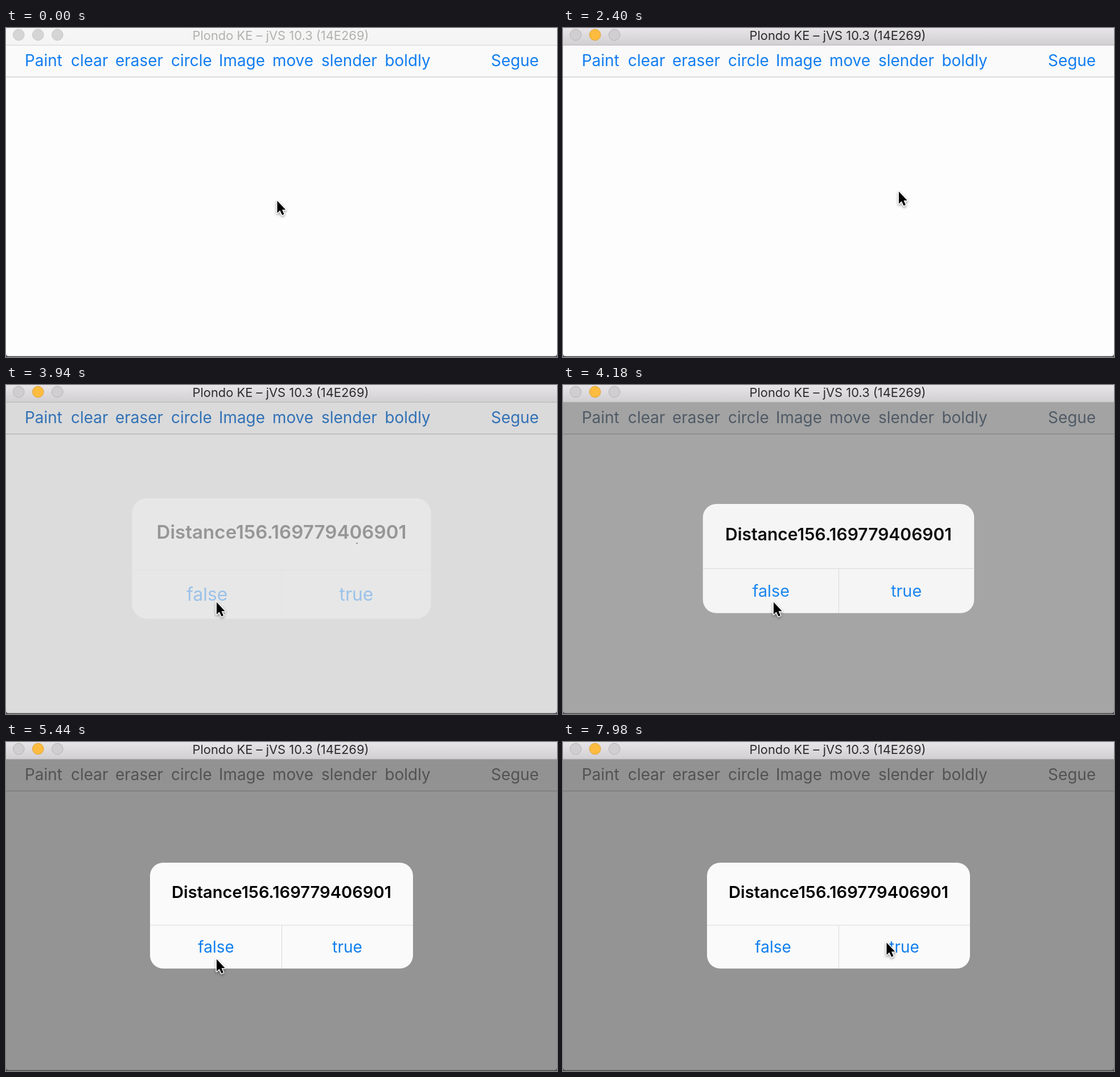
Write an HTML page with a canvas that moves like this. It is 968 px wide and 578 px high and loops after 8 s.

```html
<!DOCTYPE html>
<html lang="en">
<head>
<meta charset="utf-8">
<title>Paint demo</title>
<style>
  html, body { margin: 0; width: 100%; height: 100%; overflow: hidden; background: #fdfdfd; }
  canvas { display: block; }
</style>
</head>
<body>
<canvas id="stage" width="968" height="578"></canvas>
<script>
const ctx = document.getElementById('stage').getContext('2d');
const W = 968, H = 578, LOOP = 8000;
const APP_TOP = 31;
const ACTIVATE = 1900;   // first click focuses the window
const ALERT = 3880;      // second click opens the alert
const SETTLE = 163;      // time constant of the alert animation

const menu = [
  ['Paint', 35], ['clear', 115], ['eraser', 193], ['circle', 291], ['Image', 376],
  ['move', 470], ['slender', 555], ['boldly', 667.5], ['Segue', 853]
];

// Pointer stops: time, x, y
const path = [
  [40, 476, 303], [820, 614, 278], [1540, 616, 276], [2200, 616, 276],
  [3180, 373, 375], [3700, 369.5, 381], [6500, 369.5, 381], [7960, 568, 352]
];

const mix = (a, b, p) => a + (b - a) * p;
const clamp = p => Math.max(0, Math.min(1, p));
const ease = p => p * p * (3 - 2 * p);
const font = (size, weight = 400) => `${weight} ${size}px Inter, "Open Sans", sans-serif`;

function rect(x, y, w, h, color) {
  ctx.fillStyle = color;
  ctx.fillRect(x, y, w, h);
}

function text(str, x, y, color, align = 'center') {
  ctx.fillStyle = color;
  ctx.textAlign = align;
  // Left-aligned labels start at their visible edge
  if (align === 'left') x += ctx.measureText(str).actualBoundingBoxLeft;
  ctx.fillText(str, x, y);
}

function pointerAt(t) {
  let i = 0;
  while (i < path.length - 2 && t >= path[i + 1][0]) i++;
  const [t0, x0, y0] = path[i], [t1, x1, y1] = path[i + 1];
  const p = ease(clamp((t - t0) / (t1 - t0)));
  return [mix(x0, x1, p), mix(y0, y1, p)];
}

function drawTitleBar(active) {
  const shade = ctx.createLinearGradient(0, 0, 0, 30);
  shade.addColorStop(0, active ? '#e7e5e7' : '#f6f6f6');
  shade.addColorStop(1, active ? '#d1cfd1' : '#f4f4f4');
  rect(0, 0, W, 30, shade);
  rect(0, 29.7, W, 1, active ? '#b4b2b4' : '#cfcfcf');
  [22, 56, 90].forEach((x, i) => {
    const lit = active && i === 1;
    ctx.beginPath();
    ctx.arc(x + 0.3, 12, 9.8, 0, 7);
    ctx.fillStyle = lit ? '#fdbc40' : active ? '#d0ced0' : '#d5d5d5';
    ctx.fill();
    ctx.strokeStyle = lit ? '#dfa037' : active ? '#b5b3b5' : '#c6c6c6';
    ctx.lineWidth = 1;
    ctx.stroke();
  });
  ctx.font = font(21.9);
  text('Plondo KE – jVS 10.3 (14E269)', 482.5, 20.5, active ? '#2c2c2c' : '#b1b1ae');
}

function drawApp(t, shown) {
  rect(0, 30, W, H - 30, '#fdfdfd');
  rect(0, APP_TOP, W, 54.6, '#fafafa');
  rect(0, 85.6, W, 0.9, '#b2b2b6');
  const tint = [18, 125, 240].map(c => Math.round(mix(c, 140, shown)));
  ctx.font = font(27.9);
  for (const [label, x] of menu) text(label, x, 66.5, `rgb(${tint})`, 'left');
  if (t >= ALERT) rect(615.5, 277, 2, 2, '#222');
  rect(0, 30, W, H - 30, `rgba(0,0,0,${0.415 * shown})`);
}

function drawAlert(shown) {
  const scale = mix(1.2, 1, shown);
  ctx.save();
  ctx.globalAlpha = Math.min(1, shown * 1.12);
  ctx.translate(484, 304.9);
  ctx.scale(scale, scale);
  ctx.beginPath();
  ctx.roundRect(-231, -93, 462, 186, 23);
  ctx.fillStyle = '#fafafa';
  ctx.fill();
  rect(-231, 16.6, 462, 0.9, '#d6d6da');
  rect(0, 17, 0.9, 76, '#d6d6da');
  ctx.font = font(29.1, 600);
  text('Distance156.169779406901', 0, -31, '#000');
  ctx.font = font(27.9);
  text('false', -115, 65.3, '#0e7eee');
  text('true', 115.5, 65.3, '#0e7eee');
  ctx.restore();
}

function drawFrame() {
  rect(0, 576.5, W, 1.5, '#4c4a4e');
  ctx.fillStyle = '#4c4a4e';
  for (const [x, side] of [[0, 1], [W, -1]]) {
    ctx.beginPath();
    ctx.moveTo(x, H - 6);
    ctx.quadraticCurveTo(x, H - 1, x + 6 * side, H - 1);
    ctx.lineTo(x, H);
    ctx.fill();
  }
}

const arrow = new Path2D('M0 0V21.5L4.8 17L8.6 25L12 23.5L8.5 15.7H14.8Z');

function drawPointer(x, y) {
  ctx.save();
  ctx.translate(x + 0.5, y + 0.5);
  ctx.lineWidth = 3;
  ctx.lineJoin = 'round';
  ctx.strokeStyle = '#fff';
  ctx.shadowColor = 'rgba(0,0,0,.4)';
  ctx.shadowBlur = 4;
  ctx.shadowOffsetY = 2;
  ctx.stroke(arrow);
  ctx.shadowColor = 'transparent';
  ctx.fillStyle = '#000';
  ctx.fill(arrow);
  ctx.restore();
}

function draw(now) {
  const t = now % LOOP;
  const shown = t < ALERT ? 0 : 1 - Math.exp((ALERT - t) / SETTLE);
  drawApp(t, shown);
  drawTitleBar(t >= ACTIVATE);
  drawFrame();
  if (shown) drawAlert(shown);
  drawPointer(...pointerAt(t));
  requestAnimationFrame(draw);
}
requestAnimationFrame(draw);
</script>
</body>
</html>
```
